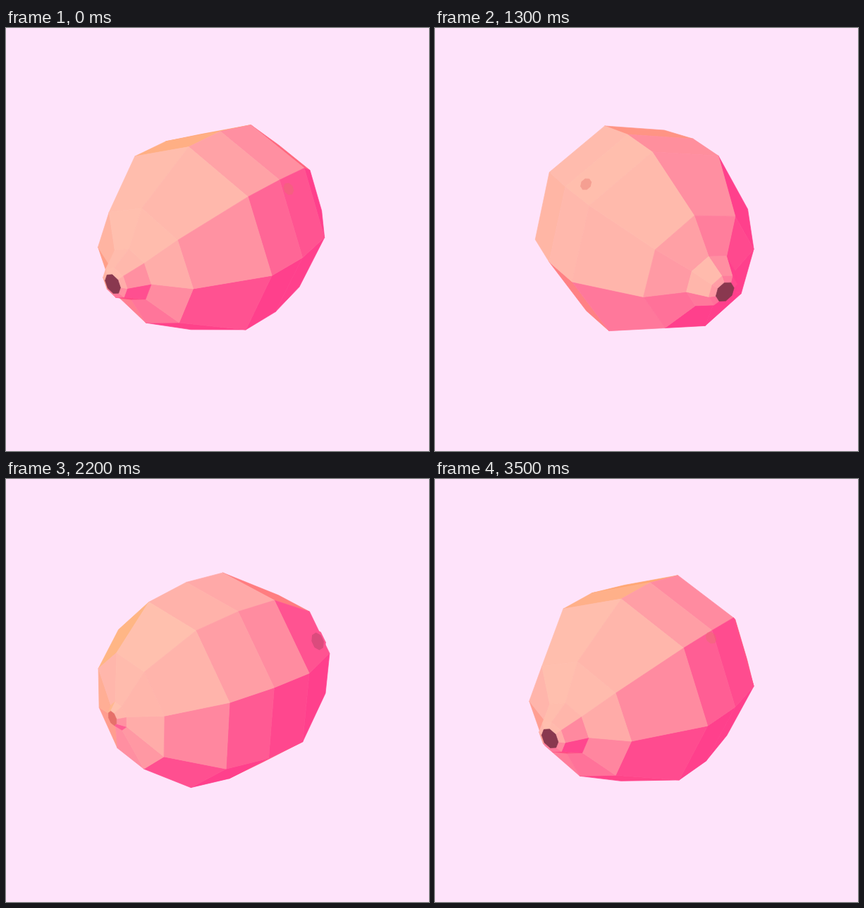
Recreate the animation shown at these times as an HTML page with a canvas. Size 600 px wide and 600 px high, loop 3.6 s.

```html
<!DOCTYPE html>
<html lang="en">
<head>
<meta charset="utf-8">
<title>Turning lemon</title>
<style>
  html, body { margin: 0; width: 100%; height: 100%; overflow: hidden; background: #fee3fa; }
  canvas { display: block; width: 600px; height: 600px; }
</style>
</head>
<body>
<canvas id="stage" width="600" height="600"></canvas>
<script>
const ctx = document.getElementById('stage').getContext('2d');
const LOOP = 3600, STEP = 100;
const CX = 296, CY = 285, CAMERA = 1500, SIDES = 8;
const RAD = Math.PI / 180;
const TILT_SIN = Math.sin(27.3 * RAD), TILT_COS = Math.cos(27.3 * RAD);

// Lathe profile from stem to far end: [position on axis, radius]
const PROFILE = [[203, 14], [199, 22], [171, 38], [145, 87], [53, 143],
  [-12, 145], [-79, 134], [-146, 82], [-165, 20], [-175, 10]];

const clamp = (v, lo, hi) => Math.min(hi, Math.max(lo, v));
const mix = (a, b, k) => a + (b - a) * k;
const sinDeg = a => Math.sin(a * RAD);
const cosDeg = a => Math.cos(a * RAD);

// Two turns per loop, the first quicker; each lingers while the stem faces us
function yawAt(step) {
  const turn = 76 + 20 * step - 71.3 * sinDeg(10 * step + 7.3);
  const linger = 0.5 - 0.13 * cosDeg(10 * step - 115);
  return -2 * Math.atan(linger * Math.tan(turn * RAD / 2));
}

// Rolls by one side per loop, with a slight wobble
const rollAt = step =>
  (360 / SIDES * step / 36 - 5 + 5 * cosDeg(20 * step) - 4 * sinDeg(10 * step)) * RAD;

// World to view space: x right, y up, z towards the viewer
const toView = (x, y, z) => [x, y * TILT_COS - z * TILT_SIN, z * TILT_COS + y * TILT_SIN];

function project([x, y, z]) {
  const s = CAMERA / (CAMERA - z);
  return [CX + s * x, CY - s * y];
}

function buildRings(yaw, roll) {
  const sin = Math.sin(yaw), cos = Math.cos(yaw);
  return PROFILE.map(([along, radius]) => Array.from({ length: SIDES }, (_, i) => {
    const a = roll + i * 2 * Math.PI / SIDES;
    const side = radius * Math.cos(a);
    return toView(along * sin + side * cos, radius * Math.sin(a), along * cos - side * sin);
  }));
}

function normal(p) {
  const a = p[2].map((v, i) => v - p[0][i]);
  const b = p[3].map((v, i) => v - p[1][i]);
  const n = [a[1] * b[2] - a[2] * b[1], a[2] * b[0] - a[0] * b[2], a[0] * b[1] - a[1] * b[0]];
  const len = Math.hypot(...n);
  return n.map(v => v / len);
}

// Pink to peach by light, with an orange glow at grazing angles
function shade([x, y, z]) {
  const raw = 75 - 77 * x + 54 * y + 106 * z;
  const lit = clamp(raw > 170 ? mix(170, raw, 0.5) : raw, 64, 196);
  const k = (lit - 64) / 128;
  const rim = clamp(1 - z / mix(0.16, 0.5, k), 0, 1);
  const g = mix(lit, 90 + lit * 0.52, rim);
  const b = mix(140 + k * 34, 95, rim);
  return `rgb(255,${Math.round(g)},${Math.round(b)})`;
}

function fillPoly(points, color, alpha = 1) {
  ctx.globalAlpha = alpha;
  ctx.beginPath();
  points.map(project).forEach(p => ctx.lineTo(...p));
  ctx.closePath();
  ctx.fillStyle = ctx.strokeStyle = color;
  ctx.fill();
  if (alpha === 1) ctx.stroke();
  ctx.globalAlpha = 1;
}

function visibleFaces(rings) {
  const faces = [];
  for (let r = 0; r < rings.length - 1; r++) {
    for (let i = 0; i < SIDES; i++) {
      const j = (i + 1) % SIDES;
      const pts = [rings[r][i], rings[r + 1][i], rings[r + 1][j], rings[r][j]];
      const n = normal(pts);
      const mid = [0, 1, 2].map(c => pts.reduce((sum, p) => sum + p[c], 0) / 4);
      const facing = n[0] * mid[0] + n[1] * mid[1] + n[2] * (mid[2] - CAMERA) < 0;
      if (facing) faces.push({ pts, depth: mid[2], color: shade(n) });
    }
  }
  return faces.sort((a, b) => a.depth - b.depth);
}

function draw(step) {
  const yaw = yawAt(step);
  const rings = buildRings(yaw, rollAt(step));
  const front = Math.cos(yaw) * TILT_COS;

  ctx.fillStyle = '#fee3fa';
  ctx.fillRect(0, 0, 600, 600);
  ctx.lineWidth = 0.7;
  ctx.lineJoin = 'round';
  visibleFaces(rings).forEach(f => fillPoly(f.pts, f.color));

  // The hidden end shows faintly through the skin
  fillPoly(rings[0], '#89384f', front > -0.1 ? 1 : 0.3);
  fillPoly(rings[rings.length - 1], '#e6706a', front > 0 ? 0.4 : 1);
}

const start = performance.now();
let shown = -1;
function tick() {
  const step = Math.floor(((performance.now() - start) % LOOP) / STEP);
  if (step !== shown) draw(shown = step);
  requestAnimationFrame(tick);
}
tick();
</script>
</body>
</html>
```
